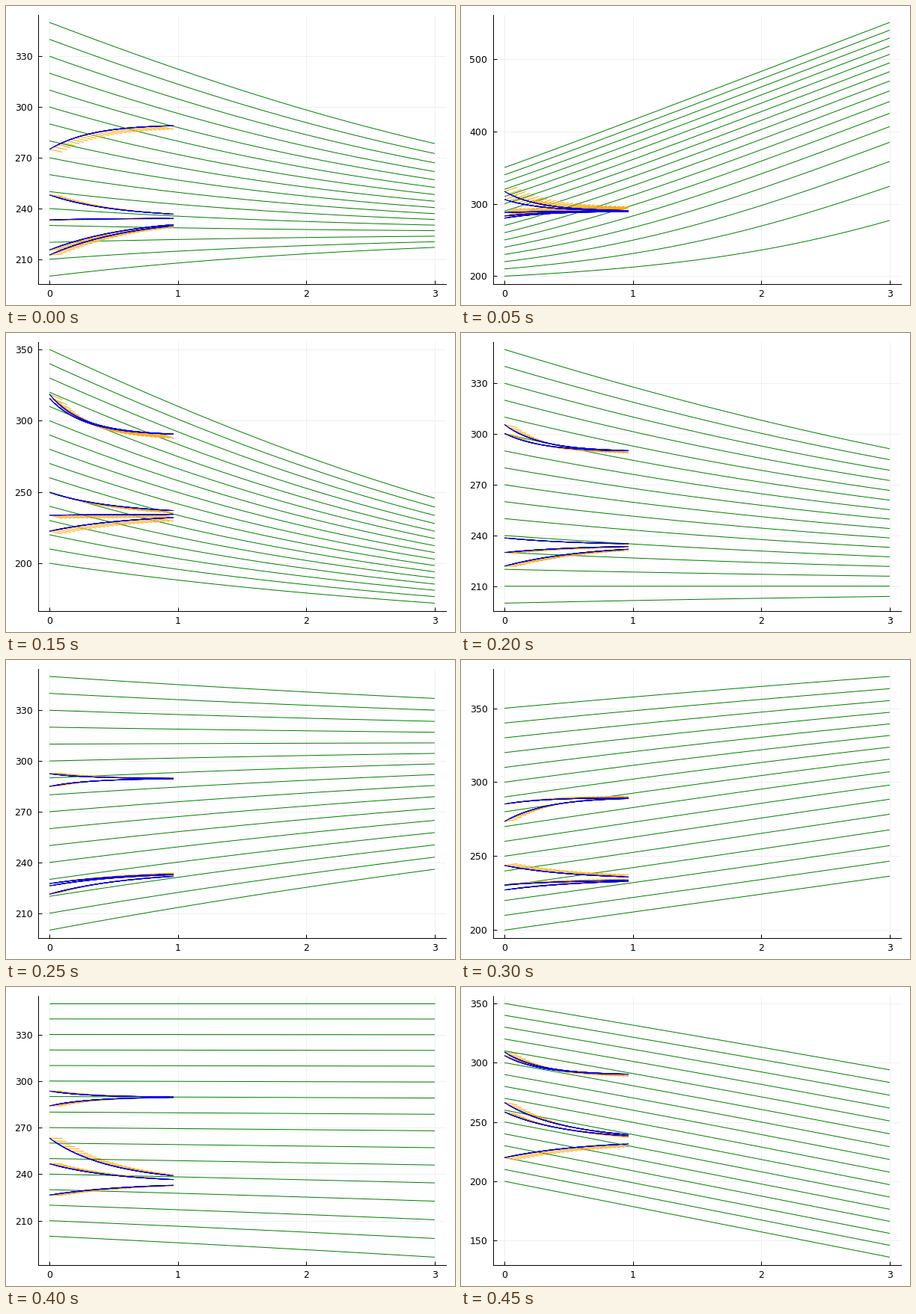
Recreate the animation shown at these times as a matplotlib script. Size 600 by 400 pixels, loop 0.5 s.

```python
import numpy as np
import matplotlib.pyplot as plt
from matplotlib.animation import FuncAnimation
from matplotlib.collections import LineCollection

W, H, DPI = 600, 400, 100
PX = 72 / DPI
FRAMES = 10
STEP = 1 / 30
SAMPLES, SPAN = 30, 4            # points per trajectory, points per short forecast

plt.rcParams["font.family"] = "DejaVu Sans"
plt.rcParams["font.size"] = 9

GRID_STARTS = np.arange(200.0, 351, 10)
ANCHORS = GRID_STARTS[::5]

# Key poses: where the learned flow carries the anchors, then the
# initial temperatures of the observed trajectories.
KEYS = {
    0: (217, 233.5, 252.5, 278.4, 275, 248, 233.3, 215.5, 212.5),
    1: (277, 425, 494.7, 550.5, 317, 306, 288, 283, 280),
    2: (194.5, 244, 297, 348, 293.4, 263, 257.7, 252.4, 236.2),
    3: (172, 194, 217.3, 245.6, 318.6, 315.7, 249.7, 233.7, 222.5),
    5: (236, 272, 304.5, 337, 292.5, 285, 227.5, 226.2, 221.3),
    7: (237, 305, 358.7, 406, 278, 262, 260, 235, 233),
    9: (136, 186.7, 240, 294, 309, 306, 266.4, 258.4, 220),
}


def climate(temp):
    """Energy balance with an abrupt ice-albedo switch."""
    albedo = np.where(temp > 271, 0.3, 0.7)
    return 342 * (1 - albedo) - 0.6 * 5.67e-8 * temp ** 4


def flow(rate, start, steps, dt=STEP):
    """Runge-Kutta path of every start value, one row per time."""
    path = [np.array(start, float)]
    for _ in range(steps):
        t = path[-1]
        k1 = rate(t)
        k2 = rate(t + dt / 2 * k1)
        k3 = rate(t + dt / 2 * k2)
        k4 = rate(t + dt * k3)
        path.append(t + dt / 6 * (k1 + 2 * k2 + 2 * k3 + k4))
    return np.array(path)


def drift(coef):
    return lambda t: np.vander(np.tanh((t - 250) / 80), len(coef)) @ coef


def learned_rate(ends, stages=10, eps=1e-4):
    """Smooth drift taking the anchors to their ends in three time units.

    The ends are moved out gradually so that Newton's method stays close."""
    def shoot(c):
        return flow(drift(c), ANCHORS, 30, 0.1)[-1]

    coef = np.zeros(len(ANCHORS))
    for part in np.linspace(0, 1, stages + 1)[1:]:
        goal = ANCHORS + part * (ends - ANCHORS)
        for _ in range(2):
            now = shoot(coef)
            jac = np.array([shoot(coef + d) - now for d in eps * np.eye(len(coef))]).T / eps
            coef = coef + np.linalg.lstsq(jac, goal - now, rcond=None)[0]
    return drift(coef)


def segment(first, values):
    times = (first + np.arange(len(values))) * STEP
    return np.column_stack([times, values])


def build(frame):
    """Line segments of one training round: flow, forecasts, observations."""
    pose = np.array([np.interp(frame, list(KEYS), column) for column in zip(*KEYS.values())])
    ends, starts = np.split(pose, [len(ANCHORS)])
    rate = learned_rate(ends)
    curves = [segment(0, col) for col in flow(rate, GRID_STARTS, 90).T]
    forecasts, observed = [], []
    first = np.arange(SAMPLES - SPAN + 1)
    for truth in flow(climate, starts, SAMPLES - 1).T:
        ahead = flow(rate, truth[first], SPAN - 1)
        forecasts += [segment(i, ahead[:, i]) for i in first]
        observed += [segment(i, truth[i:i + SPAN]) for i in first]
    return curves, forecasts, observed, observed


SCENES = [build(i) for i in range(FRAMES)]

fig = plt.figure(figsize=(W / DPI, H / DPI), dpi=DPI, facecolor="white")
ax = fig.add_axes([42.7 / W, 1 - 371.6 / H, 545.6 / W, 359.8 / H])
ax.set_xlim(-0.09, 3.09)
ax.set_xticks(range(4))
ax.spines[["top", "right"]].set_visible(False)
ax.spines[["left", "bottom"]].set_linewidth(PX)
ax.set_axisbelow(True)
ax.grid(color="#f0f0f0", linewidth=PX)
ax.tick_params(direction="in", length=5 * PX, width=PX, pad=7.2 * PX)

layers = []
for z, color in enumerate(("green", "orange", "black", "blue")):
    layer = LineCollection([], colors=color, linewidths=PX, zorder=3 + z)
    ax.add_collection(layer, autolim=False)
    layers.append(layer)


def draw(i):
    scene = SCENES[i]
    for layer, lines in zip(layers, scene):
        layer.set_segments(lines)
    values = np.concatenate([line[:, 1] for lines in scene for line in lines])
    low, high = values.min(), values.max()
    span = high - low
    bottom, top = low - 0.03 * span, high + 0.03 * span
    gap = 30 if span < 165 else 50 if span < 300 else 100
    ax.set_yticks(np.arange(np.ceil(bottom / gap) * gap, top, gap))
    ax.set_ylim(bottom, top)
    return layers


anim = FuncAnimation(fig, draw, frames=FRAMES, interval=50, repeat=True,
                     repeat_delay=0, blit=False)
plt.show()
```
